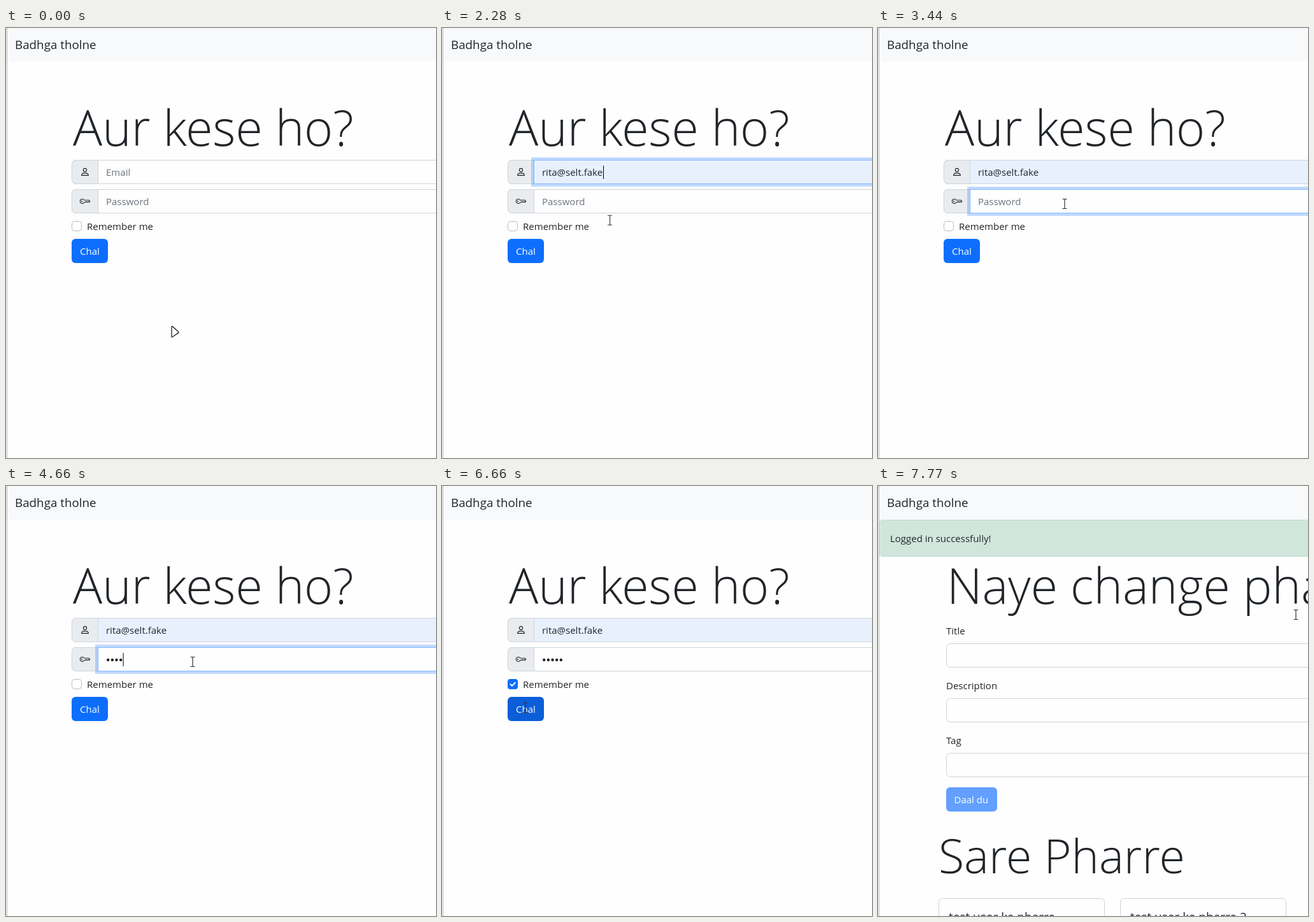
Write an HTML page that moves like this. It is 675x675 px and loops after 8000 ms.

```html
<!DOCTYPE html>
<html lang="en">
<head>
<meta charset="utf-8">
<title>Login form</title>
<style>
  html, body { margin: 0; width: 100%; height: 100%; overflow: hidden; background: #fefefe; }
  svg { display: block; width: 675px; height: 675px; }
  text { font: 15px "Open Sans", "Noto Sans", sans-serif; fill: #212529; white-space: pre; }
  .brand { font-size: 18.8px; }
  .display { font-size: 77px; font-weight: 300; }
  .second { font-size: 73.5px; }
  .hint { fill: #6c757d; }
  .small { font-size: 11.35px; fill: #111; }
  .tip { font-size: 10.43px; fill: #6e6e6e; }
  .bold { font-size: 11.3px; font-weight: 700; fill: #000; }
  .card { font-size: 19px; font-weight: 500; }
  .white { fill: #fff; }
  .box { fill: #fefefe; stroke: #ced4da; }
  .addon { fill: #e9ecef; stroke: #ced4da; }
  .icon { fill: none; stroke: #212529; stroke-width: 1.1; stroke-linejoin: round; stroke-linecap: round; }
  .heavy { stroke-width: 1.6; }
  .ring { fill: none; stroke: #0d6efd; stroke-opacity: .25; stroke-width: 4; }
  .edge { fill: none; stroke: #86b7fe; }
  .caret { fill: #000; }
  .panel { fill: #fff; filter: drop-shadow(0 4px 6px rgba(0, 0, 0, .35)); }
</style>
</head>
<body>
<svg viewBox="0 0 675 675">
  <rect width="675" height="675" fill="#fefefe"/>
  <rect width="675" height="53" fill="#f7f9fa"/>
  <text class="brand" x="14" y="33">Badhga tholne</text>

  <g id="login">
    <text class="display" x="105" y="185">Aur kese ho?</text>

    <rect class="box" x="103.5" y="207.5" width="640" height="37" rx="6"/>
    <path class="addon" d="M144.5 207.5H109.5a6 6 0 0 0-6 6v25a6 6 0 0 0 6 6h35z"/>
    <g class="icon">
      <circle cx="124" cy="223" r="2.6"/>
      <path d="M118.6 231.4c0-2.6 2.4-3.8 5.4-3.8s5.4 1.2 5.4 3.8z"/>
    </g>
    <rect id="filled" x="145" y="208" width="600" height="36" fill="#e8f0fe"/>
    <text id="emailHint" class="hint" x="157" y="232">Email</text>
    <text id="emailText" x="157" y="232">rita@selt.fake</text>

    <rect class="box" x="103.5" y="253.5" width="640" height="37" rx="6"/>
    <path class="addon" d="M144.5 253.5H109.5a6 6 0 0 0-6 6v25a6 6 0 0 0 6 6h35z"/>
    <g class="icon">
      <path d="M122.8 270.2H130l1.7 1.8-1.5 1.5-1-.9-1 .9-1-.9-1 .9-1-.9-1 1.1h-1.4a3.5 3.5 0 1 1 0-3.5z"/>
      <circle cx="119" cy="272" r=".5"/>
    </g>
    <text id="passHint" class="hint" x="157" y="278">Password</text>
    <g id="dots"></g>

    <g id="emailFocus">
      <rect class="ring" x="142" y="205" width="610" height="42"/>
      <rect class="edge" x="144.5" y="207.5" width="610" height="37"/>
    </g>
    <g id="passFocus">
      <rect class="ring" x="142" y="251" width="610" height="42"/>
      <rect class="edge" x="144.5" y="253.5" width="610" height="37"/>
    </g>
    <rect id="emailCaret" class="caret" x="157" y="216" width="1" height="21"/>
    <rect id="endCaret" class="caret" x="253" y="216" width="1" height="21"/>
    <rect id="passCaret" class="caret" x="157" y="262" width="1" height="21"/>

    <rect id="checkFocus" class="ring" x="101" y="301" width="20" height="20" rx="6"/>
    <rect x="103.5" y="303.5" width="15" height="15" rx="4" fill="#fff" stroke="#b9bcbf"/>
    <g id="checked">
      <rect x="103" y="303" width="16" height="16" rx="4" fill="#0d6efd"/>
      <path d="M107.5 311.2l2.5 2.5 4.8-5" fill="none" stroke="#fff" stroke-width="2" stroke-linecap="round" stroke-linejoin="round"/>
    </g>
    <text x="127" y="317">Remember me</text>

    <rect id="submit" x="103" y="331" width="57" height="38" rx="6" fill="#0d6efd"/>
    <text class="white" x="116" y="356">Chal</text>

    <g id="popup">
      <rect class="panel" x="144" y="246" width="400" height="154" rx="3"/>
      <rect id="hover" x="144" y="283" width="400" height="34" fill="#efefef"/>
      <text class="tip" x="156" y="267">Type '/' to search from your saved info</text>
      <path class="icon" d="M525 259l8.5 8.5M533.5 259l-8.5 8.5"/>
      <text class="bold" x="158" y="304">rita@selt.fake</text>
      <text class="bold" x="157" y="338">rita@selt.fake</text>
      <g class="icon heavy">
        <rect x="515.8" y="292" width="14.6" height="17.4" rx="2"/>
        <rect x="519.4" y="290.4" width="7.4" height="3.4" rx="1.5" fill="#fff"/>
      </g>
      <path d="M144 357.5h400" stroke="#d0d0d0"/>
      <g class="icon">
        <circle cx="162" cy="375.5" r="2.9"/>
        <path d="M162 386c-3 0-5-1.4-5-3.4 0-1.2.8-1.8 2-1.8h3"/>
        <rect x="163.5" y="381" width="6.5" height="4.8" rx="1" fill="#111"/>
      </g>
      <text class="small" x="183" y="384">Manage personal info</text>
    </g>
  </g>

  <g id="home">
    <rect x="1.5" y="53.5" width="700" height="57" rx="6" fill="#d0e6dc" stroke="#b9dccb"/>
    <text x="19" y="88" fill="#2b3f36">Logged in successfully!</text>
    <text class="display" x="108" y="185">Naye change pha</text>
    <g id="fields"></g>
    <rect x="107" y="473" width="80" height="38" rx="6" fill="#639ffe"/>
    <text class="white" x="119.5" y="498">Daal du</text>
    <text class="display second" x="95" y="608">Sare Pharre</text>
    <g fill="#fefefe" stroke="#d0d0d0">
      <rect x="95.5" y="647.5" width="260" height="80" rx="6"/>
      <rect x="380.5" y="647.5" width="260" height="80" rx="6"/>
    </g>
    <text class="card" x="111" y="683">test user ke pharre</text>
    <text class="card" x="396" y="683">test user ke pharre 2</text>
  </g>

  <path d="M1.5 0V675" stroke="#b4b6b8"/>

  <g id="cursor">
    <path id="arrow" d="M0 .8V16.6q.2 1 1.1.4L10.8 10.4q.8-.7 0-1.3L1.2.4Q.2-.1 0 .8z"
      fill="#fff" stroke="#222" stroke-width="1.3"/>
    <path id="beam" d="M-3.5-7.5H3.5M0-7.5V7.5M-3.5 7.5H3.5" fill="none" stroke="#333" stroke-width="1.2"/>
  </g>
</svg>

<script>
const LOOP = 8000;
const LEAD = 6; // keeps hard changes and the loop seam clear of rounding
const $ = id => document.getElementById(id);

// steps: [time, value] pairs; the first and last values are held to the loop ends
function track(el, prop, steps, easing = 'linear') {
  const all = [...steps, [LOOP, steps[steps.length - 1][1]]];
  if (all[0][0] > 0) all.unshift([0, all[0][1]]);
  el.animate(all.map(([t, v]) => ({ offset: t / LOOP, [prop]: v, easing })),
    { duration: LOOP, delay: -LEAD, iterations: Infinity });
}

// switched on and off in turn at the given times; a first time of 0 starts visible
function toggle(el, ...times) {
  const steps = times.map((t, i) => [t, 1 - i % 2]);
  if (times[0] > 0) steps.unshift([0, 0]);
  track(el, 'opacity', steps, 'step-end');
}

function fade(el, on, off) {
  track(el, 'opacity', [[on, 0], [on + 110, 1], [off, 1], [off + 110, 0]]);
}

function add(parent, tag, attrs, text = '') {
  const el = document.createElementNS('http://www.w3.org/2000/svg', tag);
  for (const k in attrs) el.setAttribute(k, attrs[k]);
  el.textContent = text;
  parent.append(el);
  return el;
}

['Title', 'Description', 'Tag'].forEach((name, i) => {
  const y = 233 + 86 * i;
  add($('fields'), 'text', { x: 107, y }, name);
  add($('fields'), 'rect', { class: 'box', x: 107.5, y: y + 14.5, width: 640, height: 37, rx: 6 });
});

// e-mail field and its suggestions
fade($('emailFocus'), 830, 2820);
toggle($('emailCaret'), 840, 1340, 1840, 1960);
toggle($('popup'), 870, 2280);
toggle($('hover'), 1960, 2280);
toggle($('filled'), 1960);
toggle($('emailText'), 1960);
toggle($('emailHint'), 0, 1960);
toggle($('endCaret'), 2280, 2820);

// password typing
const keys = [3580, 3850, 4180, 4660, 4920];
const pitch = 6.65;
keys.forEach((t, i) => {
  toggle(add($('dots'), 'circle', { cx: 160.2 + pitch * i, cy: 273, r: 2.2, fill: '#212529' }), t);
});
fade($('passFocus'), 2840, 6160);
toggle($('passHint'), 0, keys[0]);
toggle($('passCaret'), 2880, 3380, 3580, 5420);
track($('passCaret'), 'transform',
  [[0, 'translateX(0px)'], ...keys.map((t, i) => [t, `translateX(${pitch * (i + 1)}px)`])], 'step-end');

// checkbox, button and the next page
toggle($('checked'), 6160);
fade($('checkFocus'), 6160, 6500);
track($('submit'), 'fill', [[6440, '#0d6efd'], [6580, '#0b5ed7']]);
toggle($('login'), 0, 6860);
toggle($('home'), 6860);

// pointer
const path = [
  [70, 260, 468], [250, 277, 395], [450, 305, 285], [700, 321, 229],
  [1700, 321, 229], [1900, 296, 268], [2100, 263, 302],
  [2280, 263, 302], [2640, 288, 285],
  [2820, 288, 285], [3010, 293, 276],
  [5200, 293, 276], [5450, 274, 289], [5830, 188, 318], [5980, 111, 312],
  [6250, 111, 312], [6600, 131, 348],
  [6890, 131, 348], [7200, 330, 290], [7500, 580, 222], [7690, 656, 202]
];
track($('cursor'), 'transform', path.map(([t, x, y]) => [t, `translate(${x}px, ${y}px)`]));
toggle($('arrow'), 0, 450, 1790, 2280, 5470, 6520);
toggle($('beam'), 450, 1790, 2280, 5470, 6520);
</script>
</body>
</html>
```
